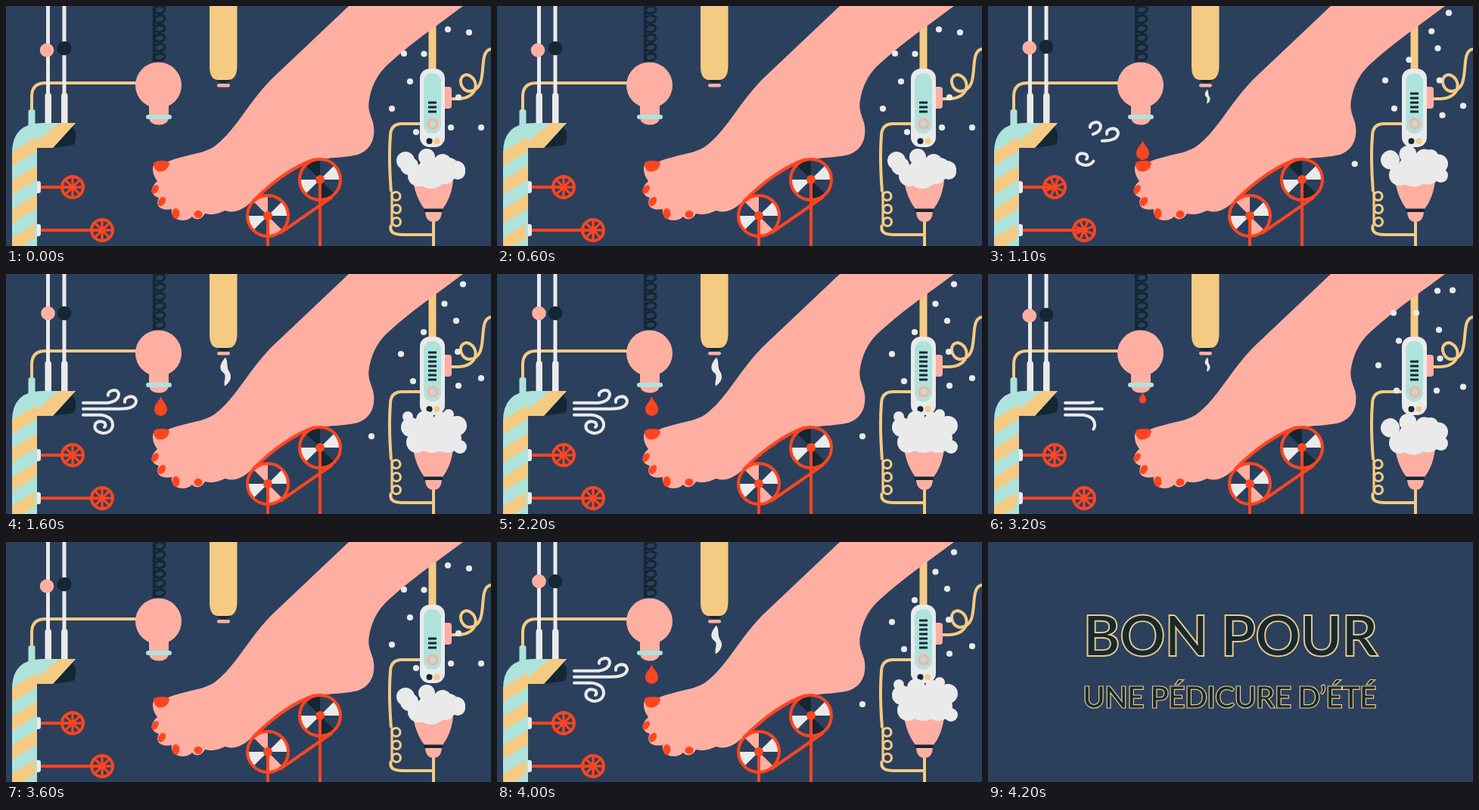
Write an HTML page that moves like this. It is 641 px wide and 318 px high and loops after 8 s.

```html
<!DOCTYPE html>
<html lang="fr">
<head>
<meta charset="utf-8">
<title>Pédicure</title>
<style>
  html, body { margin: 0; width: 100%; height: 100%; overflow: hidden; background: #2b405d; }
  svg { display: block; width: 100vw; height: 100vh; }
  .pink { fill: #ffafa2; } .gold { fill: #f5ca82; } .mint { fill: #aee3dc; }
  .white { fill: #ebeaea; } .dark { fill: #142733; } .red { fill: #ff4520; }
  .line { fill: none; stroke-width: 4; }
  .thin { stroke-width: 3.2; } .thick { stroke-width: 5; }
  .lgold { stroke: #f5ca82; } .lwhite { stroke: #ebeaea; } .lred { stroke: #ff4520; } .ldark { stroke: #142733; }
  .wisp { stroke-linecap: round; stroke-dasharray: 1 2; }
  text { font-family: Lato, sans-serif; font-weight: 700; fill: #142a33; stroke: #f5ca82; text-anchor: middle; }
</style>
</head>
<body>
<svg viewBox="0 0 641 318">
  <defs>
    <clipPath id="pipe"><path d="M8 318V195Q8 155 48 155H92L62 188H41V318Z"/></clipPath>
  </defs>
  <g id="scene">
    <!-- striped pipe and rods -->
    <path class="line lgold" d="M172 102H52Q34 102 34 120V140"/>
    <rect class="mint" x="29.5" y="137" width="9" height="26" rx="3"/>
    <path class="line thick lwhite" d="M55.5 0V120M77 0V120"/>
    <rect class="white" x="51.5" y="115" width="8.5" height="45" rx="4"/>
    <rect class="white" x="73" y="115" width="8.5" height="45" rx="4"/>
    <circle id="beadA" class="pink" r="9.3"/>
    <circle id="beadB" class="dark" r="9.3"/>
    <path class="dark" d="M61 188L90 157L88 162Q92 164 92 170V177Q92 185 84 185Z"/>
    <g clip-path="url(#pipe)">
      <rect class="mint" x="8" y="150" width="90" height="168"/>
      <g id="stripes" class="gold"></g>
      <path class="gold" d="M38 188V182L70 155H92L62 188Z"/>
    </g>
    <g id="valves"></g>

    <!-- bulb -->
    <g id="coil" class="line thin ldark"></g>
    <path id="drop" class="red" d="M0 0C2 7 8.500 10 8.500 17.500A8.500 8.500 0 0 1-8.500 17.500C-8.500 10-2 7 0 0Z"/>
    <circle class="pink" cx="201.500" cy="105" r="30.500"/>
    <path class="pink" d="M189 125H215V149Q213 157.500 202 157.500T189 149Z"/>
    <rect class="mint" x="185" y="144" width="34" height="6" rx="3"/>

    <!-- tube -->
    <path class="dark" d="M280 94H296V99Q294 102 288 102T280 99Z"/>
    <path class="gold" d="M269 0H305.500V80Q305 98 293 98H281Q269 98 269 80Z"/>
    <rect class="pink" x="279" y="103" width="17" height="4.500" rx="2.200"/>
    <path id="curl" class="white" d="M0 0C-10 12-7 17-2 21C2 25-3 32-1 38C7 33 9 25 5 19C1 13 4 6 0 0Z"/>

    <!-- leg -->
    <rect class="gold" x="558.500" width="10" height="90"/>
    <path class="pink" d="M453 0L356 92C322 124 306 162 278 184C262 197 238 196 212 207L200 206C192 208 192 222 200 232C190 240 191 252 202 254C196 266 206 272 219 269C216 285 238 288 246 279C250 284 258 284 263 275C275 278 282 274 290 271C304 276 316 268 328 256Q368 217 408 203C436 201 452 200 465 197C481 191 488 178 486 160C485 149 478 142 479.500 128C482 108 490 92 502 80C534 50 567 28 604 0Z"/>
    <g class="red">
      <path d="M195 208Q197 205 206 205Q216 205 216 209Q214 219 203 219.500Q195 219 195 208Z"/>
      <ellipse rx="4" ry="6.500" transform="translate(197 243) rotate(35)"/>
      <ellipse rx="4.500" ry="6.500" transform="translate(206 259) rotate(30)"/>
      <ellipse cx="224.500" cy="275" rx="5" ry="7"/>
      <ellipse cx="254" cy="276" rx="5.500" ry="5"/>
    </g>
    <g class="line lwhite" transform="translate(0 .8)">
      <path class="wisp" pathLength="1" d="M102 170H134Q149 168 149 158Q147 151 139 154Q134 157 135 160"/>
      <path class="wisp" pathLength="1" d="M102 178H150Q172 178 172 167Q170 160 162 162Q156 164 157 169"/>
      <path class="wisp" pathLength="1" d="M102 186H125Q142 188 141 201Q138 211 127 210Q115 207 118 198Q122 192 130 196Q133 200 130 202"/>
    </g>

    <!-- pulleys -->
    <g id="pulleys"></g>
    <path class="line lred" d="M326 259Q368 217 408 203M362 301L431 253M346 278V318M415 230V318"/>

    <!-- spray device -->
    <g class="line lgold">
      <path d="M588 123H598C626 122 626 95 609 91C596 92 600 112 612 113C641 112 621 60 641 57"/>
      <path d="M548 156H522Q508 157 508 172C506 195 507 220 509 246M509 290Q505 303 524 303H565M565 284V318"/>
      <g class="thin">
        <circle cx="515.500" cy="252" r="5.500"/><circle cx="516" cy="269" r="5.500"/><circle cx="516" cy="286" r="5.500"/>
        <path d="M510 246V290"/>
      </g>
    </g>
    <rect class="pink" x="574" y="107" width="15" height="29" rx="4"/>
    <rect class="white" x="547" y="83" width="33" height="104" rx="13"/>
    <rect class="mint" x="552" y="89" width="23" height="80" rx="11"/>
    <g id="gauge" class="dark"></g>
    <circle class="mint" cx="564" cy="156" r="6" stroke="#ffafa2" stroke-width="3.500"/>
    <circle class="dark" cx="559.500" cy="179" r="4"/>
    <circle class="gold" cx="569.500" cy="179" r="4"/>
    <path class="pink" d="M538 232H591Q588 255 577 269H553Q542 255 538 232ZM554 273H576Q575 286 565 286T554 273Z"/>
    <rect class="dark" x="552" y="268.500" width="25" height="4.500" rx="1"/>
    <g id="cloud" class="white"></g>
    <g id="dots" class="white"></g>
  </g>

  <g id="card">
    <text x="320" y="150.500" font-size="75" letter-spacing="-1" stroke-width="1.900">BON POUR</text>
    <text x="319" y="219.500" font-size="40" letter-spacing="-1.100" stroke-width="1.200">UNE PÉDICURE D’ÉTÉ</text>
  </g>
</svg>
<script>
const STEP = 100, POSES = 6, SCENE_END = 4200, LOOP = 8000;
const $ = id => document.getElementById(id);

function add(parent, tag, attrs) {
  const el = document.createElementNS('http://www.w3.org/2000/svg', tag);
  for (const key in attrs) el.setAttribute(key, attrs[key]);
  parent.append(el);
  return el;
}
const mix = (a, b, k) => a + (b - a) * k;
const place = (el, x, y, r) => {
  el.setAttribute('cx', x);
  el.setAttribute('cy', y);
  if (r) el.setAttribute('r', r);
};
const show = (el, on) => el.style.visibility = on ? 'inherit' : 'hidden';

for (let y = 193; y < 360; y += 38)
  add($('stripes'), 'path', { d: `M8 ${y}L41 ${y - 20}V${y - 1}L8 ${y + 19}Z` });

for (let i = 0; i < 6; i++)
  add($('coil'), 'ellipse', { rx: 7, ry: 4.8, transform: `translate(203 ${5 + i * 12.5}) rotate(-12)` });
add($('coil'), 'path', { d: 'M195.500 0V74' });

const wheels = [[88, 240], [127, 297]].map(([x, y]) => {
  const g = add($('valves'), 'g', {});
  add(g, 'rect', { x: 38, y: y - 8, width: 8, height: 16, rx: 3, class: 'white' });
  add(g, 'rect', { x: 38, y: y - 9, width: 3, height: 18, class: 'mint' });
  add(g, 'path', { d: `M46 ${y}H${x}`, class: 'line lred' });
  const wheel = add(g, 'g', {});
  add(wheel, 'circle', { cx: x, cy: y, r: 14, class: 'line lred' });
  for (let a = 0; a < 180; a += 45)
    add(wheel, 'path', { d: `M${x - 14} ${y}h28`, transform: `rotate(${a} ${x} ${y})`, class: 'line thin lred' });
  add(g, 'circle', { cx: x, cy: y, r: 4, class: 'red' });
  return { wheel, x, y };
});

// Four coloured sectors alternate with the background, clockwise from the upper right.
function pulley(x, y, sectors) {
  const g = add($('pulleys'), 'g', {});
  add(g, 'circle', { cx: x, cy: y, r: 27, fill: '#2b405d' });
  sectors.forEach((name, i) => add(g, 'path', {
    d: `M${x} ${y}v-27a27 27 0 0 1 19.100 7.900z`, class: name, transform: `rotate(${45 + i * 90} ${x} ${y})`
  }));
  add(g, 'circle', { cx: x, cy: y, r: 27, class: 'line lred' });
  add(g, 'circle', { cx: x, cy: y, r: 6, class: 'red' });
}
pulley(346, 278, ['white', 'pink', 'white', 'pink']);
pulley(415, 230, ['white', 'dark', 'white', 'dark']);

const bars = Array.from({ length: 7 }, (_, i) =>
  add($('gauge'), 'rect', { x: 558, y: 138.5 - i * 6, width: 11, height: 3 }));

// Each puff: x, y, r at rest, then x, y, r at full blow.
const puffs = [
  [528, 205, 12, 535, 203, 13], [533, 212, 12, 531, 189, 7], [556, 200, 11, 554, 193, 12],
  [577, 208, 12, 576, 194, 11], [585, 215, 14, 585, 186, 7], [595, 217, 12, 596, 201, 13],
  [597, 220, 10, 600, 229, 9], [562, 222, 20, 563, 214, 23], [545, 225, 14, 543, 223, 14],
  [580, 222, 14, 583, 218, 19]
].map(p => ({ p, el: add($('cloud'), 'circle', {}) }));

// Each speck: start, position four poses later, first and last visible pose.
const specks = [
  [584, 31, 604, 13.5], [552.5, 63.5, 579.5, 39.5], [534, 100, 552, 77], [510, 136, 522, 106],
  [542, 167, 538, 142], [588, 161, 598, 148], [628, 161, 628, 138], [598, 121, 597, 103],
  [612, 35, 616, 8, 0, 2], [526, 63, 546, 40, 0, 2], [597, 86, 595, 62, 2, 5], [476, 238, 483, 215, 3, 5]
].map(p => ({ p, el: add($('dots'), 'circle', { r: 4.1 }) }));

const blow = [0, .25, .5, .75, 1, .5];
const drip = [[156, 0], [156, .3], [157, .55], [159, .8], [162, 1], [178, 1]];
const wisps = document.querySelectorAll('.wisp');

function pose(n) {
  const k = blow[n];
  place($('beadA'), mix(54, 55.5, k), mix(58.5, 52, k));
  place($('beadB'), 77, mix(56, 52, k));
  $('drop').setAttribute('transform', `translate(204.500 ${drip[n][0]}) scale(${drip[n][1]})`);
  $('curl').setAttribute('transform', `translate(290 110.500) scale(${k})`);
  wisps.forEach(el => {
    show(el, k);
    el.style.strokeDashoffset = n === 5 ? -.5 : 1 - k;
  });
  wheels.forEach(({ wheel, x, y }) => wheel.setAttribute('transform', `rotate(${n * 22.5} ${x} ${y})`));
  bars.forEach((el, i) => show(el, i < 3 + 4 * k));
  puffs.forEach(({ p, el }) => place(el, mix(p[0], p[3], k), mix(p[1], p[4], k), mix(p[2], p[5], k)));
  specks.forEach(({ p: [x, y, x2, y2, first = 0, last = 5], el }) => {
    place(el, mix(x, x2, n / 4), mix(y, y2, n / 4));
    show(el, n >= first && n <= last);
  });
}

function draw() {
  const t = performance.now() % LOOP, playing = t < SCENE_END;
  show($('scene'), playing);
  show($('card'), !playing);
  pose(Math.floor(t / STEP) % POSES);
  requestAnimationFrame(draw);
}
draw();
</script>
</body>
</html>
```
